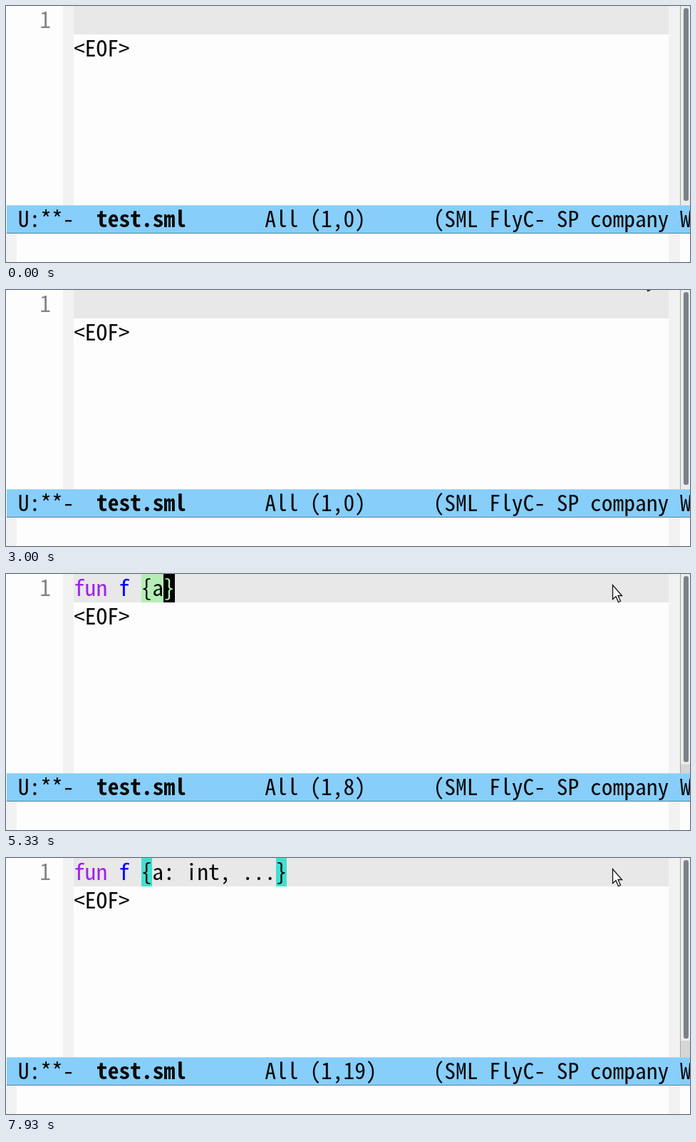
Animation of 960 by 360 pixels, one loop 8 s. Source, as an HTML page with a canvas:

```html
<!DOCTYPE html>
<html lang="en">
<head>
<meta charset="utf-8">
<title>Typing a record pattern</title>
<style>
  html, body { margin: 0; width: 100%; height: 100%; overflow: hidden; background: #fdfdfd; }
  canvas { display: block; }
</style>
</head>
<body>
<canvas id="stage" width="960" height="360"></canvas>
<script>
const ctx = document.getElementById('stage').getContext('2d');
const LOOP = 8000, CELL = 15.75, ROW = 40, LEFT = 95;
const FAMILY = '"Noto Sans Mono CJK JP", "Noto Sans Mono", monospace';
const C = {
  page: '#fdfdfd', line: '#e8e8e8', fringe: '#f2f2f2', bar: '#87cefa',
  ink: '#080808', number: '#858585', keyword: '#a020f0', name: '#0000ff',
  inside: '#b4eeb4', pair: '#40e0d0', thumb: '#7c8088', trough: '#d6d6d4'
};

// Each edit: time, text, cursor column
const edits = [[0, '', 0]];
const open = 'fun f {';
const inner = 'a: int, ...';
const openTimes = [3880, 3980, 4090, 4200, 4310, 4420, 5190];
const innerTimes = [5300, 5410, 5510, 5620, 5720, 5830, 6200, 6310, 6460, 6570, 6680];
openTimes.forEach((t, i) => {
  edits.push([t, open.slice(0, i + 1) + (i === 6 ? '}' : ''), i + 1]);
});
innerTimes.forEach((t, i) => {
  edits.push([t, open + inner.slice(0, i + 1) + '}', i + 8]);
});
edits.push([7330, open + inner + '}', 19]);

const pointer = [[851, 15], [851, 35], [855.5, 31], [859, 39], [862, 37.5], [858.5, 30], [864, 30]];
const glide = { from: 2950, to: 3250, dx: 60, dy: -55 };

// Font size whose advance equals one cell
ctx.font = '100px ' + FAMILY;
const size = CELL * 100 / ctx.measureText('0').width;

function rect(x, y, w, h, color) {
  ctx.fillStyle = color;
  ctx.fillRect(x, y, w, h);
}

function cells(from, to, color) {
  const x = Math.round(LEFT + from * CELL);
  rect(x, 0, Math.round(LEFT + to * CELL) - x, ROW, color);
}

function write(text, x, y, color, weight = 400) {
  ctx.font = `${weight} ${size}px ${FAMILY}`;
  ctx.fillStyle = color;
  [...text].forEach((ch, i) => ctx.fillText(ch, x + i * CELL, y));
}

function cursorShown(t, edit) {
  const since = edit === edits[0] ? t + 785 : t - edit[0];
  return since % 1000 < 500;
}

function drawScrollbar(length) {
  const end = 274 - length * 1.05;
  rect(946, 0, 14, 280, C.trough);
  rect(947, 0, 13, length ? end + 3 : 280, '#ececec');
  rect(946, 0, 1, 280, '#a6a6a6');
  ctx.fillStyle = C.thumb;
  ctx.beginPath();
  ctx.roundRect(951, 3, 7, end - 3, 3);
  ctx.fill();
}

function drawCode(text, col, blinkOn) {
  const inPair = col > 6 && col < text.length;
  if (inPair) cells(6, col + 1, C.inside);
  if (col === 19) {
    cells(6, 7, C.pair);
    cells(18, 19, C.pair);
  }
  if (blinkOn) cells(col, col + 1, '#000');
  [...text].forEach((ch, i) => {
    let color = C.ink;
    if (i < 3 && text.length >= 3) color = C.keyword;
    else if (i === 4) color = C.name;
    if (blinkOn && i === col) color = C.inside;
    write(ch, LEFT + i * CELL, 31, color);
  });
}

function drawModeLine(col) {
  rect(1, 280, 959, 40, C.bar);
  rect(1, 280, 959, 1, '#a5dafb');
  rect(1, 319, 959, 1, '#587f98');
  const put = (text, at, weight) => write(text, 1 + at * CELL, 311, C.ink, weight);
  put('U:**-', 1);
  put('test.sml', 8, 700);
  put('All', 23);
  put(`(1,${col})`, 27);
  put('(SML FlyC- SP company W', 38);
}

function drawPointer(t) {
  const p = Math.min(1, (t - glide.from) / (glide.to - glide.from));
  if (p < 0) return;
  const away = (1 - p) ** 2;
  ctx.beginPath();
  pointer.forEach(([x, y]) => ctx.lineTo(x + 0.5 + away * glide.dx, y + 0.5 + away * glide.dy));
  ctx.closePath();
  ctx.fillStyle = '#fdfdfd';
  ctx.fill();
  ctx.strokeStyle = '#111';
  ctx.lineWidth = 1.3;
  ctx.stroke();
}

function draw(t) {
  const edit = edits.filter(e => e[0] <= t).pop();
  const [, text, col] = edit;
  rect(0, 0, 960, 360, C.page);
  rect(80, 0, 15, 280, C.fringe);
  rect(930, 0, 16, 280, C.fringe);
  rect(0, 320, 15, 40, C.fringe);
  rect(930, 320, 16, 40, C.fringe);
  rect(LEFT, 0, 835, ROW, C.line);
  drawScrollbar(text.length);
  write('1', 3 * CELL, 31, C.number);
  drawCode(text, col, cursorShown(t, edit));
  write('<EOF>', LEFT, 71, C.ink);
  drawModeLine(col);
  drawPointer(t);
}

const start = performance.now();
function tick() {
  draw((performance.now() - start) % LOOP);
  requestAnimationFrame(tick);
}
tick();
</script>
</body>
</html>
```
